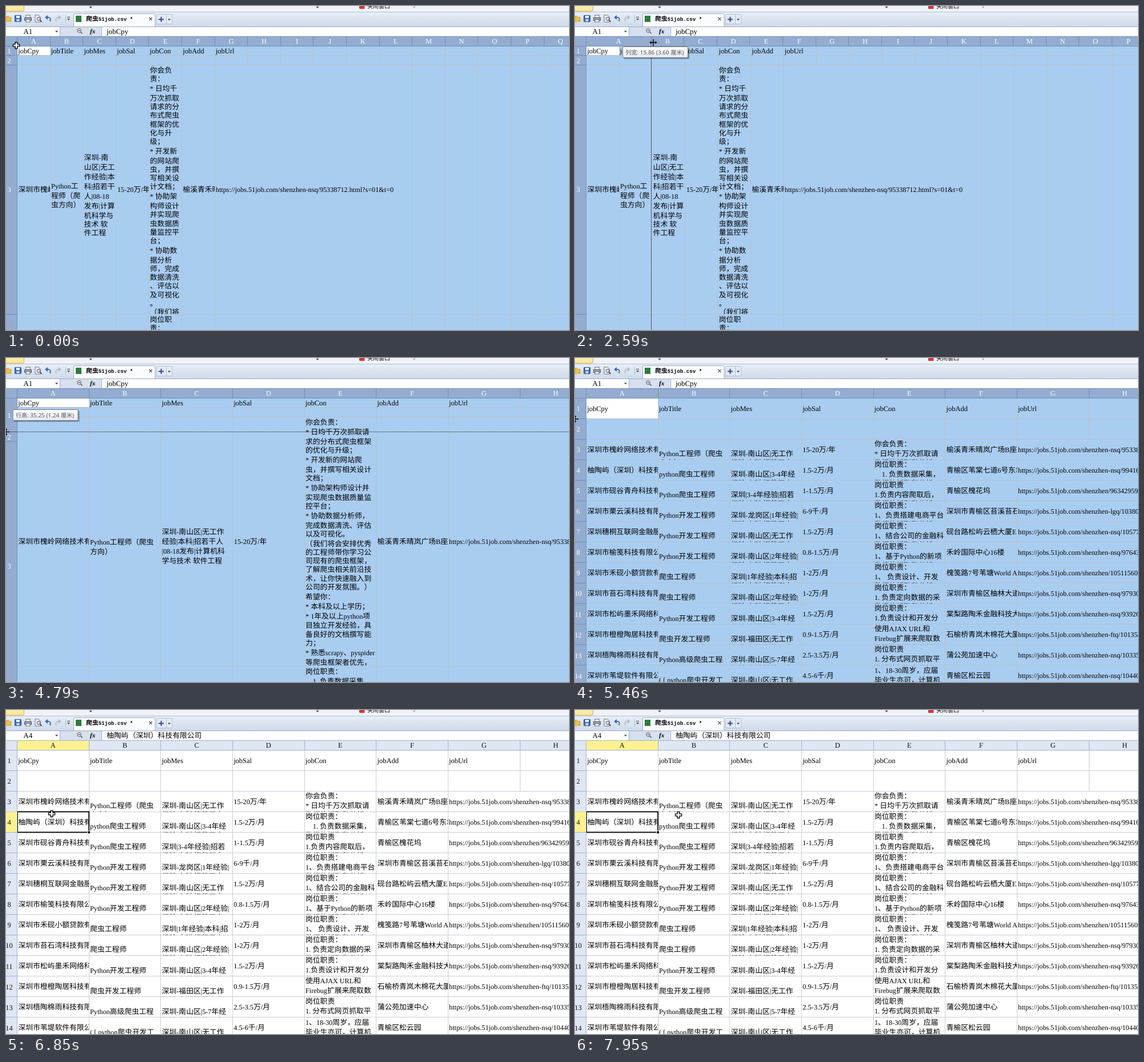
An HTML page that plays this animation: 985x568 px, repeating every 8 s.

```html
<!DOCTYPE html>
<html lang="zh-CN">
<head>
<meta charset="utf-8">
<title>Spreadsheet resizing</title>
<style>
html, body { margin: 0; width: 100%; height: 100%; overflow: hidden; background: #fff; }
#stage { display: block; --cell: #fff; --line: #c9ced6; --head: #dfe7f3; --rule: #9db4d3; --label: #111; }
#stage.all { --cell: #a9cdf1; --line: #b8c2cd; --head: #93acd0; --rule: #728fba; --label: #fff; }
text { font: 12.2px "Liberation Serif", serif; white-space: pre; text-rendering: geometricPrecision; text-spacing-trim: space-all; }
.cjk { font-family: "Noto Sans CJK SC", "Noto Sans CJK", sans-serif; font-size: 12.8px; font-weight: 350; }
.label { fill: var(--label); font-size: 12.5px; text-anchor: middle; }
.field { font-size: 12.5px; }
.bar { font-size: 12.9px; }
.hot { fill: #111; }
.tab { font: bold 9.2px "Liberation Mono", monospace; }
.tab .cjk { font-size: 10.8px; font-weight: bold; }
.tip, .tip .cjk { font: 10px "Noto Sans", "Noto Sans CJK SC", sans-serif; fill: #575757; }
.menu .cjk { font-size: 10px; }
.crisp { shape-rendering: crispEdges; }
</style>
</head>
<body>
<svg id="stage" width="985" height="568" viewBox="0 0 985 568">
  <svg id="sheet" y="70" width="985" height="498"></svg>
  <g id="heads"></g>
  <g id="bar"></g>
  <g id="formula"></g>
  <g id="over"></g>
</svg>
<script>
const $ = id => document.getElementById(id);
const W = 985, H = 568, LEFT = 19.5, TOP = 70, LOOP = 8000;
const NARROW = 57.6, WIDE = 125.65, TALL = 36.03;
const CJK = /([\u2e80-\uffef]+)/;

const esc = s => s.replace(/&/g, '&amp;');
const text = (x, y, s, cls = '') => `<text x="${x}" y="${y + 4.4}" class="${cls}">` +
  esc(s).split(CJK).map((run, i) => i % 2 ? `<tspan class="cjk">${run}</tspan>` : run).join('') + '</text>';
const rect = (x, y, w, h, fill, more = '') =>
  `<rect x="${x}" y="${y}" width="${w}" height="${h}" fill="${fill}" ${more}/>`;
const line = (x1, y1, x2, y2, color, more = '') =>
  `<path class="crisp" d="M${x1} ${y1}L${x2} ${y2}" stroke="${color}" ${more}/>`;
const path = (d, fill, stroke = 'none', more = '') => `<path d="${d}" fill="${fill}" stroke="${stroke}" ${more}/>`;
const clip = (x, y, w, h, body) =>
  `<svg x="${x}" y="${y}" width="${w}" height="${h}" viewBox="${x} ${y} ${w} ${h}">${body}</svg>`;
const at = (keys, t) => keys.reduce((last, k) => k[0] <= t ? k : last);

const FIELDS = ['jobCpy', 'jobTitle', 'jobMes', 'jobSal', 'jobCon', 'jobAdd', 'jobUrl'];
const PICKED = '柚陶屿（深圳）科技有限公司';
// company, title, message, salary, content, address, link tail
const JOBS = [
  ['深圳市槐岭网络技术有', 'Python工程师（爬虫~方向）', '深圳-南山区|无工作', '15-20万/年', '你会负责：~* 日均千万次抓取请', '榆溪青禾晴岚广场B座', '-nsq/95338712.html?s=01&t=0'],
  [PICKED, 'python爬虫工程师', '深圳-南山区|3-4年经', '1.5-2万/月', '岗位职责：~\u30001. 负责数据采集，', '青榆区苇棠七道6号东塔', '-nsq/994163'],
  ['深圳市砚谷青舟科技有', 'Python爬虫工程师', '深圳|3-4年经验|招若', '1-1.5万/月', '岗位职责~1.负责内容爬取后，', '青榆区槐花坞', '/96342959'],
  ['深圳市栗云溪科技有限', 'Python开发工程师', '深圳-龙岗区|1年经验|', '6-9千/月', '岗位职责：~1、负责搭建电商平台', '深圳市青榆区苔溪苔石', '-lgq/103801'],
  ['深圳穗桐互联网金融服', 'Python开发工程师', '深圳-南山区|无工作', '1.5-2万/月', '岗位职责：~1、结合公司的金融科', '砚台路松屿云栖大厦E', '-nsq/105771'],
  ['深圳市榆笺科技有限公', 'Python开发工程师', '深圳-南山区|2年经验|', '0.8-1.5万/月', '岗位职责：~1、基于Python的新项', '禾岭国际中心16楼', '-nsq/976431'],
  ['深圳市禾砚小额贷款有', '爬虫工程师', '深圳|1年经验|本科|招', '1-2万/月', '岗位职责：~1、 负责设计、开发', '槐笺路7号苇塘World A', '/10511560'],
  ['深圳市苔石湾科技有限', '爬虫工程师', '深圳-南山区|2年经验|', '1-2万/月', '岗位职责：~1. 负责定向数据的采', '深圳市青榆区柚林大道', '-nsq/979301'],
  ['深圳市松屿墨禾网络科', 'Python开发工程师', '深圳-南山区|3-4年经', '1.5-2万/月', '岗位职责：~1.负责设计和开发分', '棠梨路陶禾金融科技大', '-nsq/939261'],
  ['深圳市橙橙陶居科技有', '爬虫开发工程师', '深圳-福田区|无工作', '0.9-1.5万/月', '使用AJAX URL和~Firebug扩展来爬取数', '石榆桥青岚木棉花大厦', '-ftq/101353'],
  ['深圳梧陶棉雨科技有限', 'Python高级爬虫工程~师', '深圳-南山区|5-7年经', '2.5-3.5万/月', '岗位职责~1. 分布式网页抓取平', '蒲公苑加速中心', '-nsq/103351'],
  ['深圳市苇堤软件有限公', '( [ python爬虫开发工~程师 )', '深圳-南山区|无工作', '4.5-6千/月', '1、18-30周岁，应届~毕业生亦可，计算机', '青榆区松云园', '-nsq/104401'],
];
const link = job => 'https://jobs.51job.com/shenzhen' + job[6];

// "~" is a soft wrap, "\n" a paragraph break; [first line centre, text]
const NARROW_WRAP = {
  1: [316, 'Python工~程师（爬~虫方向）'],
  2: [266, '深圳-南~山区|无工~作经验|本~科|招若干~人|08-18~发布|计算~机科学与~技术 软~件工程'],
  4: [112.5, '你会负~责：\n* 日均千~万次抓取~请求的分~布式爬虫~框架的优~化与升~级；\n* 开发新~的网站爬~虫，并撰~写相关设~计文档；\n* 协助架~构师设计~并实现爬~虫数据质~量监控平~台；\n* 协助数~据分析~师，完成~数据清洗~、评估以~及可视化~。~（我们将'],
  next: [549.5, '岗位职~责：'],
};
const WIDE_WRAP = {
  1: [322.5, 'Python工程师（爬虫~方向）'],
  2: [305, '深圳-南山区|无工作~经验|本科|招若干人~|08-18发布|计算机科~学与技术 软件工程'],
  4: [112.5, '你会负责：\n* 日均千万次抓取请~求的分布式爬虫框架~的优化与升级；\n* 开发新的网站爬~虫，并撰写相关设计~文档；\n* 协助架构师设计并~实现爬虫数据质量监~控平台；\n* 协助数据分析师，~完成数据清洗、评估~以及可视化。\n（我们将会安排优秀~的工程师带你学习公~司现有的爬虫框架，~了解爬虫相关前沿技~术，让你快速融入到~公司的开发氛围。）\n希望你：\n* 本科及以上学历；\n* 1年及以上python项~目独立开发经验，具~备良好的文档撰写能~力；\n* 熟悉scrapy、pyspider~等爬虫框架者优先，~具有相关分布式经验'],
  next: [549.5, '岗位职责：\n\u30001. 负责数据采集'],
};

function paragraph(x, [y, source]) {
  let wasMixed = false;
  return source.split(/(?=[~\n])/).map((part, i) => {
    const row = part.replace(/[~\n]/, ''), mixed = /[\w*|]/.test(row);
    if (i) y += part[0] === '\n' || mixed || wasMixed ? 16.9 : 15.2;
    wasMixed = mixed;
    return text(x, y, row);
  }).join('');
}

function grid(colW, edges, gap) {
  const bottom = edges[edges.length - 1];
  let out = rect(0, TOP, W, bottom - TOP, 'var(--cell)') +
    edges.slice(1).map(y => line(LEFT, y, W, y, 'var(--line)')).join('');
  for (let i = 1, x; (x = LEFT + i * colW) < W; i++)
    out += line(x, TOP, x, i >= 7 && i < gap ? edges[2] : bottom, 'var(--line)');
  return out + rect(20, TOP, colW - 1, edges[1] - TOP - 0.5, '#fff', 'class="crisp"') +
    FIELDS.map((f, i) => text(LEFT + i * colW + 1.7, (edges[0] + edges[1]) / 2 + 0.5, f, 'field')).join('');
}

const SHORT_ROWS = [TOP, 86.5, 103, 540, 977];
const TALL_ROWS = Array.from({ length: 20 }, (_, i) => 70.3 + i * TALL);

function flatSheet(colW, wrap, gap) {
  const job = JOBS[0], [, , top, bottom] = SHORT_ROWS;
  const cells = [0, 1, 2, 3, 4, 5].map(i => {
    const x = LEFT + i * colW, tx = x + (i === 3 ? 2.4 : 1.9);
    const body = wrap[i] ? paragraph(tx, wrap[i]) : text(tx, 322, job[i]);
    return clip(x, top, colW, bottom - top, body);
  });
  return grid(colW, SHORT_ROWS, gap) + cells.join('') +
    text(LEFT + 6 * colW + 1.7, 322, link(job)) + paragraph(LEFT + 4 * colW + 1.9, wrap.next);
}

function tallSheet() {
  let out = grid(WIDE, TALL_ROWS, 8);
  for (let n = 3; n < 20; n++) {
    const job = JOBS[(n - 3) % JOBS.length], y = TALL_ROWS[n - 1], mid = y + TALL / 2;
    const lines = [
      [[0, job[0]]],
      job[1].split('~').map((s, i) => [i ? 23.5 : 7.5, s]),
      [[7.5, job[2]], [23.5, '经验|本科|招若干人']],
      [[0, job[3]]],
      [...job[4].split('~'), '数据的抓取和分析'].map((s, i) => [[-9.6, 7.4, 23.5][i], s]),
      [[0, job[5]]],
    ];
    lines.forEach((rows, i) => {
      const x = LEFT + i * WIDE;
      out += clip(x, y, WIDE, TALL, rows.map(([dy, s]) => text(x + 1.9, mid + dy, s)).join(''));
    });
    out += text(LEFT + 6 * WIDE + 1.7, mid, link(job));
  }
  const y = TALL_ROWS[3], right = LEFT + WIDE;
  return out + `<g id="pick">${rect(20, y, WIDE - 0.5, TALL, 'none', 'stroke="#111" stroke-width="2"')}` +
    rect(right - 2.5, y + TALL - 2.5, 5, 5, '#111', 'stroke="#fff"') + '</g>';
}

function heads(firstW, colW, edges, firstRow, picked) {
  let out = rect(0, 53, W, 17, 'var(--head)') + rect(0, TOP, 19, H, 'var(--head)');
  if (picked) out += rect(LEFT, 53.5, firstW, 16.5, '#fdf28f');
  for (let i = 0, x = LEFT; x < W; i++) {
    const w = i ? colW : firstW;
    out += line(x, 53, x, TOP, 'var(--rule)') +
      text(x + w / 2, 62, String.fromCharCode(65 + i), picked && !i ? 'label hot' : 'label');
    x += w;
  }
  edges.slice(1).forEach((y, i) => {
    const n = firstRow + i, hot = picked && n === 4;
    if (hot) out += rect(0, edges[i], 19, y - edges[i], '#fdf28f');
    out += line(0, y, 19, y, 'var(--rule)') +
      text(5.5, (edges[i] + y) / 2 + 0.5, String(n), hot ? 'label hot' : 'label');
  });
  return out + line(19.5, 53, 19.5, H, 'var(--rule)') + line(0, 70, W, 70, 'var(--rule)') +
    line(0, 53.5, W, 53.5, 'var(--rule)');
}

const caret = (x, y, color = '#444') => path(`M${x - 2.5} ${y - 1}h5l-2.5 3z`, color);

function toolbar() {
  return `<defs><linearGradient id="shade" x2="0" y2="1"><stop stop-color="#e8eef7"/><stop offset="1" stop-color="#cfdaea"/></linearGradient>
    <linearGradient id="paper" x2="0" y2="1"><stop stop-color="#fff"/><stop offset="1" stop-color="#e4e8f0"/></linearGradient></defs>` +
    rect(0, 0, W, 11, '#eff3f9') + rect(-2, -4, 33.5, 13, '#fce9a4', 'stroke="#d6ab4c" rx="2"') +
    caret(148, 2) + caret(545, 2) + caret(714, 2, '#aaa') +
    rect(618, -4, 9.5, 9, '#d9343a', 'rx="1"') + text(632, -0.5, '关闭窗口', 'menu') +
    rect(0, 11, W, 25, 'url(#shade)') + line(0, 10.5, W, 10.5, '#b4bfd0') +
    path('M0 18h4l2 2h3v7H0z', '#f3c14b', '#b88a2a', 'stroke-width=".8"') +
    rect(15.5, 16.5, 11, 11, '#3f6fc4', 'stroke="#244a94" rx="1"') + rect(18, 17, 6, 4, '#fff') + rect(18.5, 23, 5, 4, '#cfdcf3') +
    rect(35, 16, 7, 5, '#fff', 'stroke="#667"') + rect(32.5, 20.5, 12, 5, '#9aa6b8', 'stroke="#556"') + rect(35, 24, 7, 4, '#fff', 'stroke="#667"') +
    path('M51 16h6l3 3v9h-9z', '#fff', '#667') + path('M59 24l3.5 4', 'none', '#444', 'stroke-width="1.6"') +
    `<circle cx="57" cy="22.5" r="3" fill="#cfe2f7" stroke="#446"/>` +
    path('M70 20h5q4 1 2 7', 'none', '#3a66b8', 'stroke-width="1.8"') + path('M73 16v8l-5-4z', '#3a66b8') +
    path('M95 20h-5q-4 1-2 7', 'none', '#b3bac6', 'stroke-width="1.8"') + path('M92 16v8l5-4z', '#b3bac6') +
    line(104, 16, 104, 29, '#aab6c8') + line(107, 19.5, 112, 19.5, '#444') + caret(109.5, 23) +
    path('M118.5 36V16q0-2.5 2.5-2.5H258.5q2.5 0 2.5 2.5V36', '#fbfcfe', '#9cadc6') +
    rect(122, 17, 10, 11, '#2f7d3b') + text(140, 22, '爬虫51job.csv *', 'tab') +
    path('M250.5 20l5 5m0-5l-5 5', 'none', '#556', 'stroke-width="1.2"') +
    rect(263.5, 14.5, 27, 17, '#e3eaf5', 'stroke="#b2bfd3" rx="2"') +
    path('M267 23.5h9M271.5 19v9', 'none', '#2d4a80', 'stroke-width="2"') +
    line(280.5, 15, 280.5, 31, '#b2bfd3') + caret(285.5, 23.5) +
    rect(0, 36, W, 17, '#fff') + rect(94, 36, 74, 17, '#d6e0ef') +
    line(0, 36.5, W, 36.5, '#9cadc6') + line(94.5, 36, 94.5, 53, '#9cadc6') + line(167.5, 36, 167.5, 53, '#9cadc6') +
    caret(88.5, 44.5) + '<circle cx="128" cy="43" r="3.3" fill="#fff" stroke="#444"/>' +
    path('M130.5 45.5l3 3M126.5 43h3', 'none', '#444', 'stroke-width="1.3"') +
    '<text x="147" y="47.5" style="font-weight:bold;font-style:italic;font-size:11px">fx</text>';
}

// [time, position of the dragged border]
const COL_DRAG = [[1220, 77], [1370, 80], [1500, 85], [1640, 91], [1770, 97], [1900, 110], [2020, 123],
  [2320, 126], [2470, 133], [2600, 140], [2730, 145]];
const ROW_DRAG = [[3940, 87], [4080, 96], [4210, 108], [4340, 117], [4480, 123], [4620, 127], [4790, 129.5],
  [4940, 124], [5070, 117], [5200, 110], [5330, 106.3]];
const POINTER = [[0, 18, 69, 'cross'], [150, 24, 68, 'cross'], [310, 36, 66, 'cross'], [470, 50, 66, 'cross'],
  [620, 63, 65, 'cross'], [780, 73, 64, 'col'], [940, 78, 64, 'col'], [1100, 81, 64, 'col'],
  [2860, 149, 64, 'col'], [3270, 112, 72, 'cross'], [3420, 57, 84, 'cross'], [3540, 24, 88, 'cross'],
  [3680, 8, 88, 'row'], [3810, 0, 88, 'row'], [5460, 0, 107, 'row'], [6330, 20, 128, 'cross'],
  [6460, 55, 160, 'cross'], [6600, 80, 182, 'cross'], [7000, 110, 183, 'cross'],
  [7120, 150, 184, 'cross'], [7370, 181, 184, 'cross']];

function pointer(x, y, kind) {
  const shape = kind === 'cross'
    ? path('M-2-6h4v4h4v4h-4v4h-4v-4h-4v-4h4z', '#fff', '#000', 'stroke-width="1.5"')
    : path('M-6 0H6M0-6V6', 'none', '#000', 'stroke-width="1.4"') + path('M-6.500 0l3-2.500v5zM6.500 0l-3-2.500v5z', '#000');
  const turn = kind === 'row' ? 'rotate(90)' : kind === 'cross' ? 'scale(.92)' : '';
  return `<g transform="translate(${x} ${y}) ${turn}">${shape}</g>`;
}

const tip = (x, y, s, opacity) => `<g opacity="${opacity}">` + rect(x + 2, y + 2, 115, 20, '#000', 'opacity=".3" rx="2"') +
  rect(x + 0.5, y + 0.5, 114, 19, 'url(#paper)', 'stroke="#767676" rx="2"') + text(x + 5.5, y + 9.3, s, 'tip') + '</g>';

const drawn = {};
function put(id, markup) {
  if (drawn[id] !== markup) $(id).innerHTML = drawn[id] = markup;
}

$('sheet').innerHTML = `<g id="narrow">${flatSheet(NARROW, NARROW_WRAP, 12)}</g>` +
  `<g id="wide">${flatSheet(WIDE, WIDE_WRAP, 8)}</g><g id="tall">${tallSheet()}</g>`;
put('bar', toolbar());

function render(t) {
  const phase = t < 2860 ? 'narrow' : t < 5460 ? 'wide' : 'tall';
  const picked = t >= 6850, skip = t >= 7510 && t < 7950 ? 3 : 0;
  const colDrag = t >= 1220 && t < 2860, rowDrag = t >= 3940 && t < 5460;
  const colW = phase === 'narrow' ? NARROW : WIDE;
  let firstW = colW, edges = SHORT_ROWS, [, x, y, kind] = at(POINTER, t), over = '';

  if (colDrag) {
    const edge = at(COL_DRAG, t)[1];
    firstW = edge - LEFT;
    x = edge + 4;
    over += line(edge + 0.5, TOP, edge + 0.5, H, '#222', 'stroke-dasharray="2 1"');
    const chars = 11 + (firstW - 77.5) * 0.135, cm = firstW * 0.03174;
    if (t >= 1770) over += tip(83, 71, `列宽: ${chars.toFixed(2)} (${cm.toFixed(2)} 厘米)`, t < 1900 ? 0.72 : 1);
  }
  if (rowDrag) {
    const edge = at(ROW_DRAG, t)[1];
    y = edge;
    edges = [TOP, edge, edge + 16.5, edge + 453.5, edge + 890];
    over += line(0, edge, W, edge, '#444', 'stroke-dasharray="2 1"');
    const points = Math.round((edge - TOP) * 0.6 / 0.75 - 0.4) * 0.75;
    if (t >= 4480) over += tip(11.5, 90, `行高: ${points.toFixed(2)} (${(points * 0.03528).toFixed(2)} 厘米)`, t < 4620 ? 0.72 : 1);
  }
  if (phase === 'tall') edges = TALL_ROWS.slice(skip, skip + 15).map(e => e - skip * TALL);

  for (const id of ['narrow', 'wide', 'tall']) $(id).style.display = id === phase ? '' : 'none';
  $('pick').style.display = picked ? '' : 'none';
  $('stage').setAttribute('class', picked ? '' : 'all');
  $('sheet').setAttribute('viewBox', `0 ${TOP + skip * TALL} ${W} ${H - TOP}`);
  put('heads', heads(firstW, colW, edges, skip + 1, picked));
  put('formula', text(30.5, 45, picked ? 'A4' : 'A1', 'bar') + text(176, 44.5, picked ? PICKED : 'jobCpy', 'bar'));
  put('over', over + pointer(x, y, kind));
}

const start = performance.now();
(function tick() {
  render((performance.now() - start) % LOOP);
  requestAnimationFrame(tick);
})();
</script>
</body>
</html>
```
